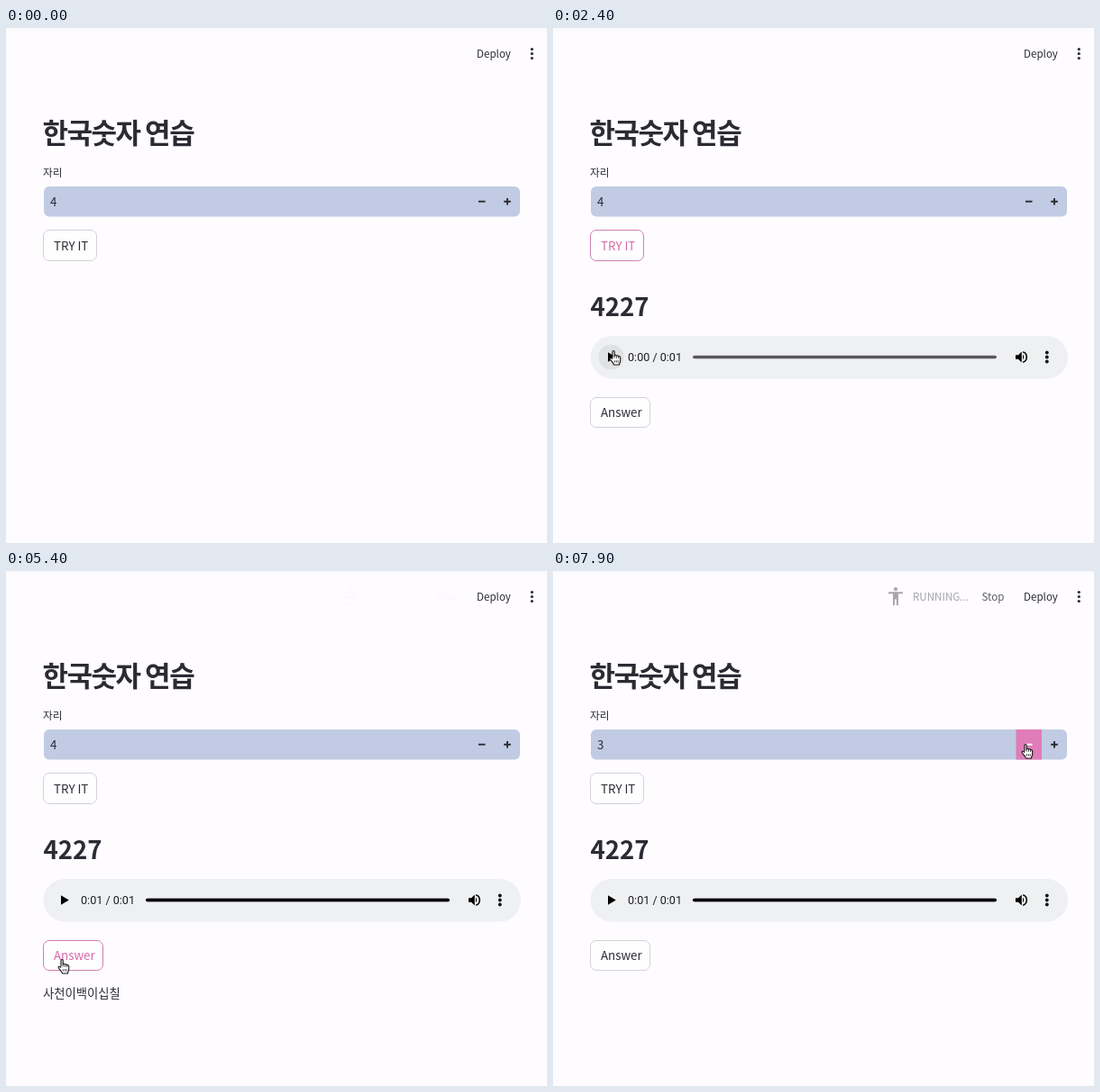
Recreate the animation shown at these times as an HTML page with a canvas. Size 600 by 572 pixels, loop 8000 ms.

```html
<!DOCTYPE html>
<html lang="ko">
<head>
<meta charset="utf-8">
<title>한국숫자 연습</title>
<style>
html, body { margin: 0; width: 100%; height: 100%; overflow: hidden; background: #fefcff; }
canvas { display: block; }
</style>
</head>
<body>
<canvas id="stage" width="600" height="572"></canvas>
<script>
const g = document.getElementById('stage').getContext('2d');
const LOOP = 8000, STEP = 100;
const INK = '#2c2a33', PINK = '#d868ab', BLUE = '#c1cbe3';
const SANS = '"Noto Sans CJK KR", "Noto Sans CJK", "Noto Sans", sans-serif';
const ROBOTO = 'Roboto, sans-serif';

// time, x, y of the pointer tip
const PATH = [
  [200, 131, 335], [700, 68, 248], [1700, 68, 248], [2200, 67, 358],
  [4100, 67, 358], [4500, 62, 431], [5700, 62, 431], [6100, 140, 385],
  [6300, 140, 385], [7000, 515, 192], [7100, 519, 192], [7200, 524, 192]
];
// time, right end of the played part
const PLAYED = [[2600, 158], [2800, 203], [3100, 257], [3400, 311], [3700, 365], [3900, 405], [4200, 460], [4300, 492]];
// time, opacity of the running status
const STATUS = [
  [1200, 0.4], [1300, 1], [1600, 0.5], [1700, 0],
  [5100, 0.4], [5200, 1], [5300, 0.5], [5400, 0.03], [5500, 0],
  [7800, 0.6], [7900, 1]
];

const HAND = new Path2D('M3 8.5V1.6C3 .2 5.2 .2 5.2 1.6V6C5.3 5 7.3 5 7.4 6.3C7.7 5.5 9.5 5.6 9.6 7C10 6.3 11.7 6.6 11.7 8V11.5C11.7 13 10.6 13.6 10.5 16H4.4C4.2 14 1.7 12.2 .3 9.7C-.4 8.2 1.5 7.4 3 9.8');
const ARROW = new Path2D('M0 0V13.5L3.1 10.7L5.2 15.4L7.5 14.4L5.4 9.8H9.6Z');

function held(keys, t, first) {
  let v = first;
  for (const [at, value] of keys) if (t >= at) v = value;
  return v;
}

function pointer(t) {
  const i = PATH.findIndex(k => k[0] > t);
  if (i < 0) return PATH[PATH.length - 1].slice(1);
  const [t0, x0, y0] = PATH[i - 1], [t1, x1, y1] = PATH[i];
  const p = (t - t0) / (t1 - t0), e = p * p * (3 - 2 * p);
  return [x0 + (x1 - x0) * e, y0 + (y1 - y0) * e];
}

function text(s, x, y, size, { weight = 400, color = INK, family = SANS, gap = 0 } = {}) {
  g.font = `${weight} ${size}px ${family}`;
  g.letterSpacing = gap + 'px';
  g.fillStyle = color;
  g.fillText(s, x, y);
}

function box(x, y, w, h, r, fill, stroke) {
  g.beginPath();
  g.roundRect(x, y, w, h, r);
  if (fill) { g.fillStyle = fill; g.fill(); }
  if (stroke) { g.strokeStyle = stroke; g.lineWidth = 1; g.stroke(); }
}

function dot(x, y, r, color) {
  g.fillStyle = color;
  g.beginPath();
  g.arc(x, y, r, 0, 7);
  g.fill();
}

function dots(x, y, r, color) {
  for (const d of [-5, 0, 5]) dot(x, y + d, r, color);
}

function line(d, width, color) {
  g.lineWidth = width;
  g.strokeStyle = color;
  g.stroke(new Path2D(d));
}

function fill(d, color) {
  g.fillStyle = color;
  g.fill(new Path2D(d));
}

function button(label, y, w, h, active) {
  box(41.5, y, w, h, 6.5, '#fffeff', active ? '#d27fb0' : '#d4d2d9');
  text(label, 53, y + h / 2 + 5, 13.3, { color: active ? PINK : INK });
}

function header(t) {
  const alpha = held(STATUS, t, 0);
  text('Deploy', 522, 33, 11.6, { weight: alpha ? 500 : 400 });
  dots(583.3, 28.5, 1.6, INK);
  if (!alpha) return;
  g.globalAlpha = alpha;
  text('RUNNING...', 399, 33, 11.6, { color: '#a5a3ad' });
  text('Stop', 475.5, 33, 11.6, { color: '#5d5b66' });
  const gray = '#a8a7ae';
  if (t < 7000) {
    dot(383.5, 20.6, 2, gray);
    line('M377 25L380 22.8L384 24.5L381.5 29.5H387V36', 2.3, gray);
    line('M384 24.5L389 25.8', 1.8, gray);
    line('M378 28.2A4.6 4.6 0 1 0 383.5 34', 1.8, gray);
  } else {
    dot(380, 20.2, 2.1, gray);
    line('M372 24.3H388', 2.1, gray);
    fill('M377 23.5H383V38H381V31.5H379V38H377Z', gray);
  }
  g.globalAlpha = 1;
}

function player(t) {
  box(41.5, 342, 529.5, 47.5, 23.75, '#eef0f2');
  dots(547.8, 365.5, 1.9, '#111');
  const loaded = t >= 1800;
  const left = loaded ? 155 : 64, right = loaded ? 492 : 520;
  box(left, 363.7, right - left, 3.6, 1.8, '#5b575f');
  if (!loaded) return;

  const end = held(PLAYED, t, 0);
  if (end) box(left, 363.7, end - left, 3.6, 1.8, '#000');
  if (t >= 2100 && t < 4900) dot(64.5, 365.5, 14, 'rgba(0,0,0,.06)');
  if (t >= 2500 && t < 4300) fill('M60.8 360.5H63.6V370.5H60.8ZM66 360.5H68.8V370.5H66Z', '#000');
  else fill('M61 360.3L69.8 365.5L61 370.7Z', '#000');
  text(`0:0${t < 3700 ? 0 : 1} / 0:01`, 83, 370, 12.6, { family: ROBOTO, color: '#1d1d1f' });
  fill('M513 363.3H516L519.8 359.6V371.4L516 367.7H513Z', '#000');
  fill('M521 362.6Q523.3 365.5 521 368.4Z', '#000');
  line('M521.2 359.8A6 6 0 0 1 521.2 371.2', 1.5, '#000');
}

function cursor(t) {
  if (t < 200) return;
  const [x, y] = pointer(t);
  const over = (l, top, r, b) => x > l && x < r && y > top && y < b;
  const hand = over(41, 224, 101, 259) || over(50, 351, 79, 380) || over(41, 410, 108, 444) || over(513, 176, 570, 209);
  g.save();
  g.translate(hand ? x - 4 : x, y);
  const shape = hand ? HAND : ARROW;
  g.lineJoin = 'round';
  if (hand) {
    g.fillStyle = '#fff';
    g.fill(shape);
    g.lineWidth = 1.1;
    g.strokeStyle = '#111';
    g.stroke(shape);
    line('M5.2 6V8.5M7.4 6.5V8.8M9.6 7.2V9M5.3 11.2V13.6M7.3 11.2V13.6M9.2 11.2V13.6', 0.8, '#111');
  } else {
    g.lineWidth = 2;
    g.strokeStyle = '#fff';
    g.stroke(shape);
    g.fillStyle = '#000';
    g.fill(shape);
  }
  g.restore();
}

function draw(t) {
  g.fillStyle = '#fefcff';
  g.fillRect(0, 0, 600, 572);
  g.fillStyle = '#fafafc';
  g.fillRect(0, 0, 600, 3);
  header(t);

  text('한국숫자 연습', 40.5, 128, 31, { weight: 700, gap: -1.5 });
  text('자리', 41, 164.5, 11.7);

  box(42, 176, 528, 33.5, 6, BLUE);
  const minus = t >= 7000;
  if (minus) {
    g.fillStyle = '#e07cb8';
    g.fillRect(513.5, 176, 28.5, 33.5);
  }
  text(t < 7500 ? '4' : '3', 49, 198, 13.3);
  line('M524 192.7H531.5', 1.9, minus ? '#fff' : INK);
  line('M552.2 192.7H559.8M556 188.9V196.5', 1.9, INK);

  button('TRY IT', 224.5, 59, 34, t >= 500 && t < 2500);
  if (t >= 1100) text('4227', 41.5, 319.5, 27.6, { weight: 700 });
  if (t >= 1400) {
    player(t);
    button('Answer', 410.5, 66, 33, t >= 4400 && t < 7500);
  }
  if (t >= 5100 && t < 7700) text('사천이백이십칠', 41, 473.5, 13.3);
  cursor(t);
}

const start = performance.now();
function tick(now) {
  const t = Math.max(0, now - start) % LOOP;
  draw(Math.floor(t / STEP) * STEP);
  requestAnimationFrame(tick);
}
draw(0);
requestAnimationFrame(tick);
</script>
</body>
</html>
```
